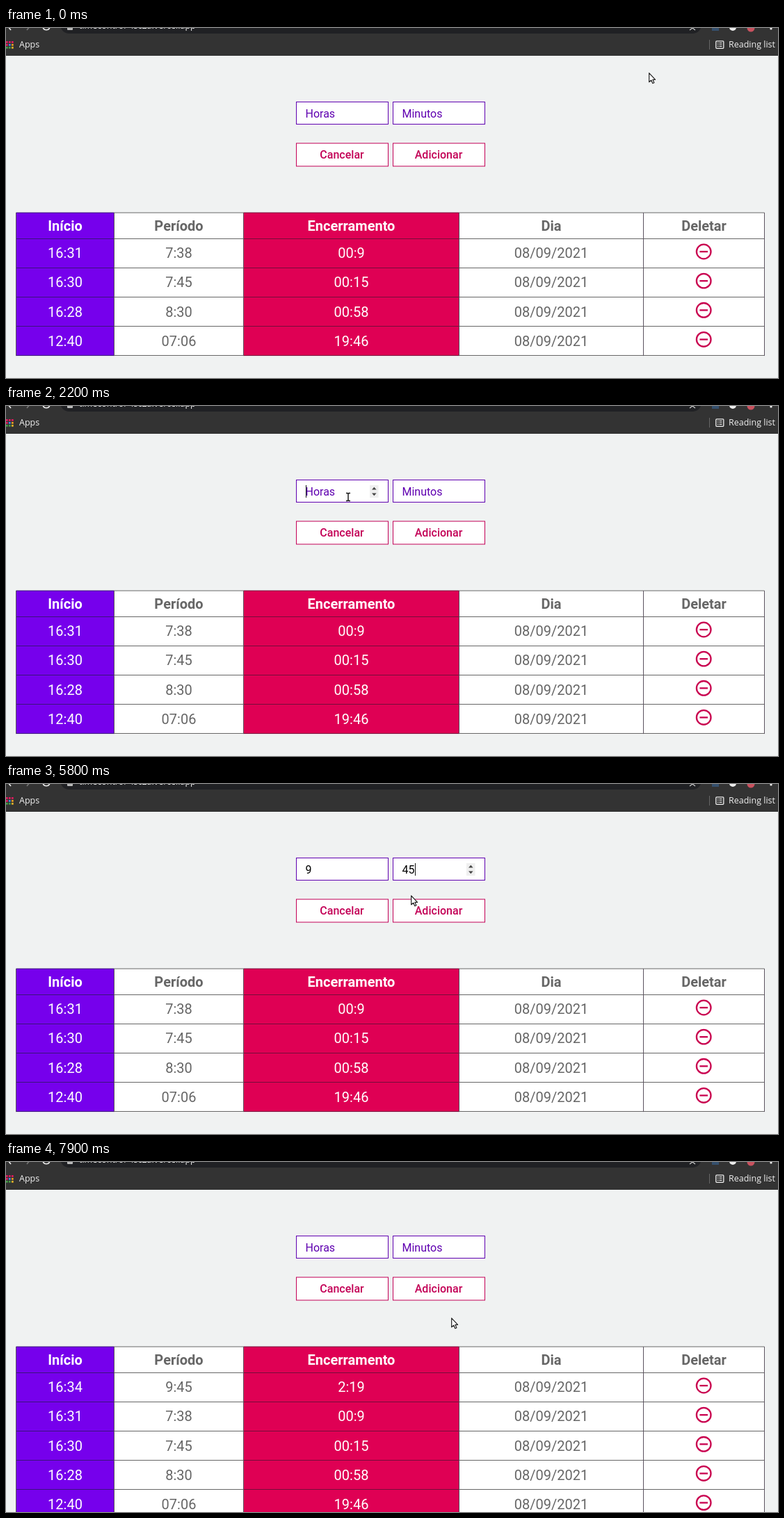
An HTML page for the animation above (8 s loop, 1110 px wide and 504 px high).

```html
<!DOCTYPE html>
<html lang="pt-BR">
<head>
<meta charset="utf-8">
<title>Controle de horas</title>
<style>
  html, body { margin: 0; width: 100%; height: 100%; overflow: hidden; background: #f0f2f2; }
  svg { display: block; width: 1110px; height: 504px; }
  text { font: 16px Roboto, sans-serif; white-space: pre; }
  .mid { text-anchor: middle; }
  .cell { font-size: 20px; }
  .head { font-weight: 700; }
  .button { font-weight: 500; }
  .chrome text { font: 12.5px "Open Sans", "Noto Sans", sans-serif; fill: #f1f1f1; }
</style>
</head>
<body>
<svg id="stage" viewBox="0 0 1110 504"></svg>
<script>
const LOOP = 8000;
const PURPLE = '#7600ec', PINK = '#df0054', GREY = '#666';
const INK = '#5f00b0', ROSE = '#c30056', ROSE_HOVER = '#d92a76';
const stage = document.getElementById('stage');

function add(parent, tag, attrs = {}, text) {
  const node = document.createElementNS('http://www.w3.org/2000/svg', tag);
  for (const key in attrs) node.setAttribute(key, attrs[key]);
  if (text !== undefined) node.textContent = text;
  return parent.appendChild(node);
}
const group = (parent, attrs) => add(parent, 'g', attrs);
const rect = (parent, x, y, width, height, fill, extra) =>
  add(parent, 'rect', { x, y, width, height, fill, ...extra });
const path = (parent, d, attrs) => add(parent, 'path', { d, fill: 'none', ...attrs });
const label = (parent, x, y, text, fill, cls = '') =>
  add(parent, 'text', { x, y, fill, class: cls }, text);
const show = (node, visible) => node.setAttribute('visibility', visible ? 'visible' : 'hidden');

// Browser bar
function drawBrowser() {
  const bar = group(stage, { class: 'chrome' });
  rect(bar, 0, 0, 1110, 40, '#333333');
  rect(bar, 78, -20, 922, 28, '#202124', { rx: 13 });
  label(bar, 105, 1, 'timecontrol-4sc2a.vercel.app', '#f1f1f1');
  const light = { stroke: '#eee', 'stroke-width': 1.6 };
  path(bar, 'M2 -3L7 3', light);
  path(bar, 'M35 -3L30 3', { ...light, stroke: '#777' });
  path(bar, 'M53 -1A5.2 5.2 0 0 0 63 -1', light);
  rect(bar, 88, -4, 8, 7, '#bbb', { rx: 1 });
  path(bar, 'M983 3L987 0L991 3', { stroke: '#ccc', 'stroke-width': 1.2 });
  rect(bar, 1015, -6, 10, 10, '#35506e');
  add(bar, 'circle', { cx: 1045, cy: -1, r: 5, fill: '#eee' });
  add(bar, 'circle', { cx: 1071, cy: 0, r: 5.5, fill: '#c9525f' });
  add(bar, 'circle', { cx: 1100, cy: 1, r: 1.6, fill: '#eee' });

  const tiles = ['#e5195f', '#e5195f', '#e5195f', '#e5195f', '#3f8cf0', '#f0a020', '#43a047', '#43a047', '#f0b428'];
  tiles.forEach((fill, i) => rect(bar, i % 3 * 4, 19 + Math.floor(i / 3) * 4, 2.7, 2.7, fill));
  label(bar, 19, 28, 'Apps');
  rect(bar, 1011, 17, 1, 14, '#666');
  rect(bar, 1020.8, 18.8, 11, 10.5, 'none', { stroke: '#eee', 'stroke-width': 1.3, rx: 1 });
  path(bar, 'M1023 21.5h1.3m1.2 0h4M1023 24h1.3m1.2 0h4M1023 26.5h1.3m1.2 0h4',
    { stroke: '#eee', 'stroke-width': 1.2 });
  label(bar, 1039, 28, 'Reading list');
}

// Form
function makeField(x, hint) {
  rect(stage, x + .5, 106.5, 132, 32, '#fff', { stroke: INK });
  const value = label(stage, x + 13.5, 128.5, hint, INK);
  const spinner = group(stage);
  rect(spinner, x + 106, 114, 12.5, 18, '#efefef');
  path(spinner, `M${x + 109} 120.5h6.6l-3.3 -3.8zM${x + 109} 125.5h6.6l-3.3 3.8z`, { fill: '#444' });
  const caret = rect(stage, 0, 114, 1, 18, '#111');

  return function update(text, focused, caretOn, hovered) {
    value.textContent = text || hint;
    value.setAttribute('fill', text ? '#000' : INK);
    caret.setAttribute('x', x + 14 + text.length * 9);
    show(caret, focused && caretOn);
    show(spinner, focused || hovered);
  };
}

function makeButton(x, name) {
  const box = rect(stage, x + .5, 166, 132, 33, '#fff', { stroke: ROSE });
  const text = label(stage, x + 66, 188, name, ROSE, 'mid button');
  return function update(hot) {
    box.setAttribute('fill', hot ? '#f8f8f8' : '#fff');
    box.setAttribute('stroke', hot ? ROSE_HOVER : ROSE);
    text.setAttribute('fill', hot ? ROSE_HOVER : ROSE);
  };
}

// Table
const EDGES = [14.5, 155.5, 341.5, 651.5, 916.5, 1090.5];
const HEADS = ['Início', 'Período', 'Encerramento', 'Dia', 'Deletar'];
const ROWS = [['16:31', '7:38', '00:9'], ['16:30', '7:45', '00:15'], ['16:28', '8:30', '00:58'], ['12:40', '07:06', '19:46']];
const ROW_STEP = 42.15;

function makeTable(rows) {
  const table = group(stage);
  const bottom = 303.5 + rows.length * ROW_STEP;
  const fills = [PURPLE, '#fff', PINK, '#fff', '#fff'];
  const inks = ['#fff', GREY, '#fff', GREY];
  const center = i => (EDGES[i] + EDGES[i + 1]) / 2;
  fills.forEach((fill, i) =>
    rect(table, EDGES[i], 266, EDGES[i + 1] - EDGES[i], bottom - 266, fill));

  HEADS.forEach((name, i) => label(table, center(i), 291.5, name, inks[i] || GREY, 'mid cell head'));
  rows.forEach((row, r) => {
    const y = 331.2 + r * ROW_STEP;
    [...row, '08/09/2021'].forEach((text, i) => label(table, center(i), y, text, inks[i], 'mid cell'));
    add(table, 'circle', { cx: 1003.2, cy: y - 9.2, r: 10.3, fill: 'none', stroke: '#c9004f', 'stroke-width': 2.3 });
    rect(table, 997.4, y - 10.3, 11.6, 2.3, '#c9004f');
  });

  const lines = [266, ...Array.from({ length: rows.length + 1 }, (_, r) => Math.floor(303 + r * ROW_STEP + .3) + .5)];
  lines[0] = 266;
  lines.forEach(y => EDGES.slice(0, -1).forEach((x, i) =>
    path(table, `M${x} ${y}H${EDGES[i + 1]}`, { stroke: i === 0 ? '#3b147c' : i === 2 ? '#760d3a' : GREY })));
  EDGES.forEach(x => path(table, `M${x} 266V${bottom}`, { stroke: '#5c5360' }));
  return table;
}

// Pointers, each drawn around its hot spot
function makePointers() {
  const outline = { fill: '#fff', stroke: '#222', 'stroke-width': 1.2, 'stroke-linejoin': 'round' };
  const arrow = group(stage), beam = group(stage), hand = group(stage);
  path(arrow, 'M.7 .8V13.8L3.7 11.1L5.8 15.7L7.9 14.7L5.9 10.3H9.6Z', outline);
  const bar = 'M-3 -5.5H-1L0 -4.5L1 -5.5H3M0 -4.5V4.5M-3 5.5H-1L0 4.5L1 5.5H3';
  path(beam, bar, { stroke: '#fff', 'stroke-width': 3 });
  path(beam, bar, { stroke: '#111', 'stroke-width': 1.4 });
  path(hand, 'M-1.2 9V1.2Q0 -.6 1.3 1.2V5.2L6.6 6.3Q8.3 6.8 8 8.6L7 13.8H-.2L-3.7 9.6Q-4.3 7.6 -2.6 7.9Z', outline);
  path(hand, 'M1.3 5.2V8M3.7 6V8.3M6 6.5V8.6', { stroke: '#222', 'stroke-width': .8 });
  return { arrow, beam, hand };
}

// [time, x, y] of the hot spot
const TRACK = [
  [0, 924, 64], [100, 900, 68], [200, 826, 82], [300, 716, 102], [400, 604, 122], [500, 528, 137],
  [600, 498, 143], [800, 495, 136], [900, 493, 132], [1000, 492, 131],
  [5400, 494, 133], [5500, 498, 138], [5700, 540, 149], [5800, 582, 160], [5900, 606, 167], [6000, 615, 169],
  [6700, 540, 188], [6800, 464, 208], [6900, 417, 219], [7900, 640, 224]
];
// Text in both fields, focused field (-1 for none), caret
const INPUT = [
  [0, '', '', -1, 0], [1000, '', '', 0, 1], [1600, '', '', 0, 0], [2200, '', '', 0, 1],
  [2800, '', '', 0, 0], [3500, '9', '', 0, 1], [3900, '9', '', 0, 0], [4200, '9', '', 1, 1],
  [4600, '9', '45', 1, 1], [5200, '9', '45', 1, 0], [5700, '9', '45', 1, 1], [6500, '', '', -1, 0]
];
const at = (steps, t) => steps.findLast(step => step[0] <= t);
const inside = (x, y, left, top, height) => x >= left && x < left + 133 && y >= top && y <= top + height;

drawBrowser();
const columns = [417, 556];
const fields = [makeField(417, 'Horas'), makeField(556, 'Minutos')];
const buttons = [makeButton(417, 'Cancelar'), makeButton(556, 'Adicionar')];
const before = makeTable(ROWS);
const after = makeTable([['16:34', '9:45', '2:19'], ...ROWS]);
const pointers = makePointers();

function render(t) {
  const [, x, y] = at(TRACK, t);
  const [, hours, minutes, focus, caretOn] = at(INPUT, t);
  const overField = columns.some(left => inside(x, y, left, 106, 31));
  const overButton = columns.some(left => inside(x, y, left, 165, 34));

  fields.forEach((update, i) =>
    update([hours, minutes][i], focus === i, caretOn, inside(x, y, columns[i], 106, 33)));
  buttons[0](inside(x, y, 417, 165, 34));
  buttons[1](t >= 6300 && inside(x, y, 556, 165, 34));
  show(before, t < 6500);
  show(after, t >= 6500);

  const active = overField ? 'beam' : overButton ? 'hand' : 'arrow';
  for (const name in pointers) {
    pointers[name].setAttribute('transform', `translate(${x} ${y})`);
    show(pointers[name], name === active);
  }
}

const start = performance.now();
function tick() {
  render((performance.now() - start) % LOOP);
  requestAnimationFrame(tick);
}
tick();
</script>
</body>
</html>
```
